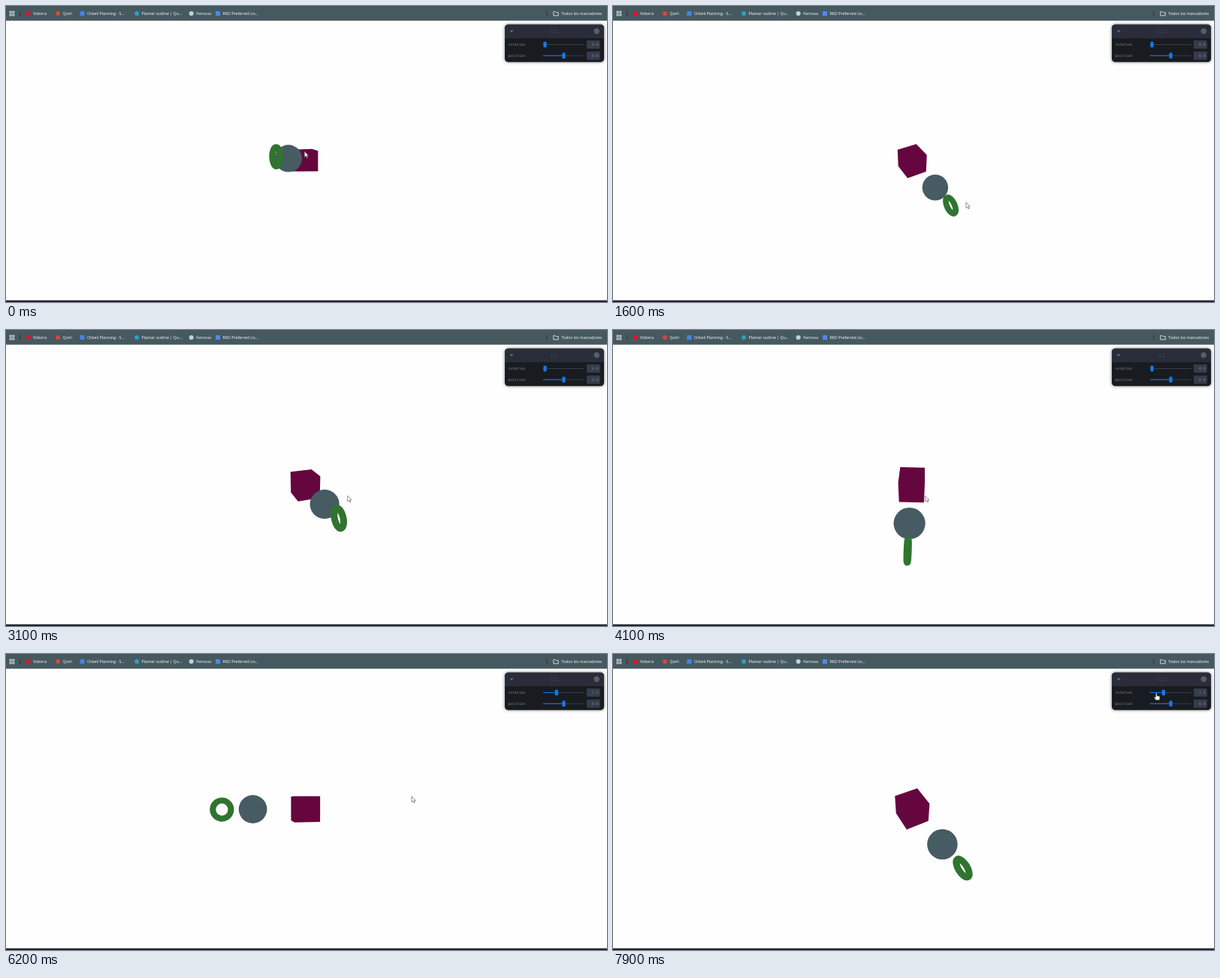
Write an HTML page that moves like this. It is 800 by 395 pixels and loops after 8 s.

```html
<!DOCTYPE html>
<html lang="es">
<head>
<meta charset="utf-8">
<title>Scene controls</title>
<style>
  html, body { margin: 0; width: 100%; height: 100%; overflow: hidden; background: #fefefe; }
  svg { display: block; width: 800px; height: 395px; }
  .bar text { font: 5.3px "Open Sans", "Noto Sans", sans-serif; fill: #fff; }
  .panel text { font: 4.8px "DejaVu Sans Mono", monospace; fill: #7c8292; }
</style>
</head>
<body>
<svg viewBox="0 0 800 395">
  <defs>
    <filter id="soft" x="-10%" y="-25%" width="120%" height="150%"><feGaussianBlur stdDeviation="2"/></filter>
  </defs>
  <rect width="800" height="395" fill="#fefefe"/>
  <rect y="392.7" width="800" height="2.3" fill="#24262f"/>

  <g class="bar">
    <rect width="800" height="19.6" fill="#45595f"/>
    <g fill="none" stroke="#f0f3f4" stroke-width=".8">
      <path d="M5 7h2.2v2.2h-2.2zM8.8 7h2.2v2.2h-2.2zM5 10.8h2.2v2.2h-2.2zM8.8 10.8h2.2v2.2h-2.2z"/>
      <path d="M728.8 7.6h2.4l1 1h3v4.2h-6.4z"/>
    </g>
    <path d="M18.9 6.5v7M719.8 6.5v7" stroke="#23333a" stroke-width=".9"/>
    <g id="marks"></g>
    <text x="739.3" y="11.8">Todos los marcadores</text>
  </g>

  <polygon id="cube" fill="#65063f"/>
  <circle id="ball" fill="#465b62"/>
  <ellipse id="ring" fill="none" stroke="#30742f" stroke-linejoin="round"/>

  <g class="panel">
    <rect x="664" y="24.8" width="132" height="50" rx="4.5" opacity=".53" filter="url(#soft)"/>
    <rect x="664" y="24.8" width="132" height="50" rx="4.5" fill="#181c20"/>
    <path d="M664 43V29.3a4.5 4.5 0 0 1 4.5-4.5h123a4.5 4.5 0 0 1 4.5 4.5V43z" fill="#292d39"/>
    <path d="M670.5 32.5h5l-2.5 2.7z" fill="#6e7484"/>
    <path d="M725.8 32h8.5M725.8 35.2h8.5" stroke="#535760" stroke-width="1.2" stroke-dasharray="1.2 2.4"/>
    <circle cx="786.2" cy="33.6" r="3.2" fill="#4a4f5c" stroke="#777d8c" stroke-width=".8"/>
    <path d="M784.8 32.4l2.8 2.4M786.4 31.6v1.8" stroke="#8c92a0" stroke-width=".6"/>
    <g id="rows"></g>
  </g>

  <path id="arrow" fill="#fff" stroke="#55585c" stroke-width=".65" stroke-linejoin="round"
    d="M0 0V7.6L1.8 6L3.1 8.8L4.3 8.3L3.1 5.6H5.3Z"/>
  <path id="hand" fill="#fff" stroke="#26282c" stroke-width=".5" stroke-linejoin="round"
    d="M-.8.8Q0-.3.8.8V4L2 3.9L3 4.3L4 4.6Q4.8 5 4.7 6L4.2 8.3V9.6H-.6L-2.9 6.2Q-3.1 5-2 5.2L-.8 6.2Z"/>
</svg>

<script>
const LOOP = 8000, STEP = 100, RAD = Math.PI / 180;
const CENTER = { x: 398, y: 206.5 }, FOCAL = 337;
const CUBE = .95, BALL = { at: 1.96, r: .513 }, RING = { at: 3.03, r: .32, tube: .106 };

const $ = id => document.getElementById(id);

function set(el, attrs) {
  for (const k in attrs) el.setAttribute(k, attrs[k]);
}

function add(parent, tag, attrs, text) {
  const el = document.createElementNS('http://www.w3.org/2000/svg', tag);
  set(el, attrs);
  if (text) el.textContent = text;
  parent.append(el);
  return el;
}

function bookmark(x, fill, label, square) {
  const g = $('marks');
  if (square) add(g, 'rect', { x: x - 9.5, y: 7, width: 6, height: 6, fill });
  else add(g, 'circle', { cx: x - 6.5, cy: 10, r: 3, fill });
  add(g, 'text', { x, y: 11.8 }, label);
}
bookmark(36, '#e2122b', 'Vidorra');
bookmark(75.6, '#d9453a', 'Qorli');
bookmark(108, '#4384ea', 'Orbeli Planning - S...', true);
bookmark(180.6, '#2d9fc3', 'Planter outline | Qu...');
bookmark(253.2, '#b5d4e4', 'Fernova');
bookmark(288.6, '#4a8bf0', 'RKD Preferred Lis...', true);

function slider(label, y) {
  const g = $('rows');
  add(g, 'text', { x: 668.2, y: y + 1.7 }, label);
  add(g, 'rect', { x: 715, y: y - .5, width: 54.5, height: 1, fill: '#373c4b' });
  const fill = add(g, 'rect', { x: 715, y: y - .5, height: 1, fill: '#147af0' });
  const thumb = add(g, 'rect', { y: y - 3.8, width: 4, height: 7.6, rx: .7, fill: '#147cf4' });
  add(g, 'rect', { x: 773, y: y - 5.5, width: 17.8, height: 11, rx: 1.2, fill: '#373c4b' });
  const num = add(g, 'text', { x: 788.6, y: y + 1.7, 'text-anchor': 'end' });
  return (x, value) => {
    set(fill, { width: x - 715 });
    set(thumb, { x: x - 2 });
    num.textContent = value.toFixed(1);
  };
}
const setRotation = slider('rotation', 51.5);
slider('position', 66.3)(742.5, 0);

// Drags: time, camera azimuth and elevation in degrees, pointer x and y
const DRAGS = [
  [0, 108.6, -2.7, 397.3, 194],
  [1000, 28, -1.8, 485.8, 224.2],
  [1600, 62, 38, 470, 262],
  [2200, 50, 6.4, 488, 221],
  [4100, 92.4, 39.8, 415.6, 221.2],
  [4700, 176, 1, 335, 205],
  [5400, 176, 1, 726, 49.5],
  [5900, 176, 1, 733, 50],
  [6200, 165, 2, 540, 190],
  [6700, 105, 14, 560, 215],
  [7100, 60, 3, 589.7, 186.6],
  [LOOP - STEP, 58.5, 46, 723.3, 52]
];

const clamp = k => Math.min(1, Math.max(0, k));
const smooth = k => k * k * (3 - 2 * k);
const between = (t, from, to) => clamp((t - from) / (to - from));

function pose(t) {
  const i = Math.max(1, DRAGS.findIndex(row => row[0] >= t));
  const a = DRAGS[i - 1], b = DRAGS[i];
  const k = smooth(between(t, a[0], b[0]));
  return a.map((v, n) => v + (b[n] - v) * k).slice(1);
}

// World to view space: x right, y down, z towards the viewer
function orbit([x, y, z], azimuth, elevation) {
  const c = Math.cos(azimuth), s = Math.sin(azimuth);
  const depth = x * s + z * c;
  const ce = Math.cos(elevation), se = Math.sin(elevation);
  return [x * c - z * s, depth * se - y * ce, depth * ce + y * se];
}

function project([x, y, z], distance) {
  const scale = FOCAL / (distance - z);
  return { x: CENTER.x + x * scale, y: CENTER.y + y * scale, scale };
}

function hull(points) {
  const cross = (o, a, b) => (a.x - o.x) * (b.y - o.y) - (a.y - o.y) * (b.x - o.x);
  const half = list => {
    const out = [];
    for (const p of list) {
      while (out.length > 1 && cross(out.at(-2), out.at(-1), p) <= 0) out.pop();
      out.push(p);
    }
    return out.slice(0, -1);
  };
  const sorted = points.sort((a, b) => a.x - b.x || a.y - b.y);
  return [...half(sorted), ...half([...sorted].reverse())];
}

function drawCube(azimuth, elevation, distance) {
  const ends = [-CUBE / 2, CUBE / 2];
  const corners = ends.flatMap(x => ends.flatMap(y => ends.map(z =>
    project(orbit([x, y, z], azimuth, elevation), distance))));
  set($('cube'), { points: hull(corners).map(p => `${p.x},${p.y}`).join(' ') });
}

function drawBall(azimuth, elevation, distance) {
  const p = project(orbit([BALL.at, 0, 0], azimuth, elevation), distance);
  set($('ball'), { cx: p.x, cy: p.y, r: BALL.r * p.scale });
}

// A thick ellipse has the outline of a tilted torus
function drawRing(azimuth, elevation, distance) {
  const at = orbit([RING.at, 0, 0], azimuth, elevation);
  const normal = orbit([0, 0, 1], azimuth, elevation);
  const sight = [-at[0], -at[1], distance - at[2]];
  const length = Math.hypot(...sight);
  const facing = normal.reduce((sum, n, i) => sum + n * sight[i] / length, 0);
  const [nx, ny] = normal.map((n, i) => n - facing * sight[i] / length);
  const p = project(at, distance);
  const ry = RING.r * p.scale;
  set($('ring'), {
    rx: Math.max(.05, ry * Math.abs(facing)), ry,
    'stroke-width': 2 * RING.tube * p.scale,
    transform: `translate(${p.x} ${p.y}) rotate(${Math.atan2(ny, nx) / RAD})`
  });
}

function draw(t) {
  const [azimuth, elevation, px, py] = pose(t);
  const view = [azimuth * RAD, elevation * RAD, 11.4 - 1.7 * smooth(between(t, 2600, 3600))];
  const turn = 1.5 * between(t, 5500, 5900);
  drawCube(view[0] - turn, view[1], view[2]);
  drawBall(...view);
  drawRing(...view);
  setRotation(717.5 + turn * 10.2, turn);

  const over = px > 714 && py < 70;
  const transform = `translate(${px} ${py})`;
  set($('arrow'), { transform, visibility: over ? 'hidden' : 'visible' });
  set($('hand'), { transform, visibility: over ? 'visible' : 'hidden' });
}

const start = performance.now();
function tick() {
  const t = (performance.now() - start) % LOOP;
  draw(Math.floor(t / STEP) * STEP);
  requestAnimationFrame(tick);
}
tick();
</script>
</body>
</html>
```
